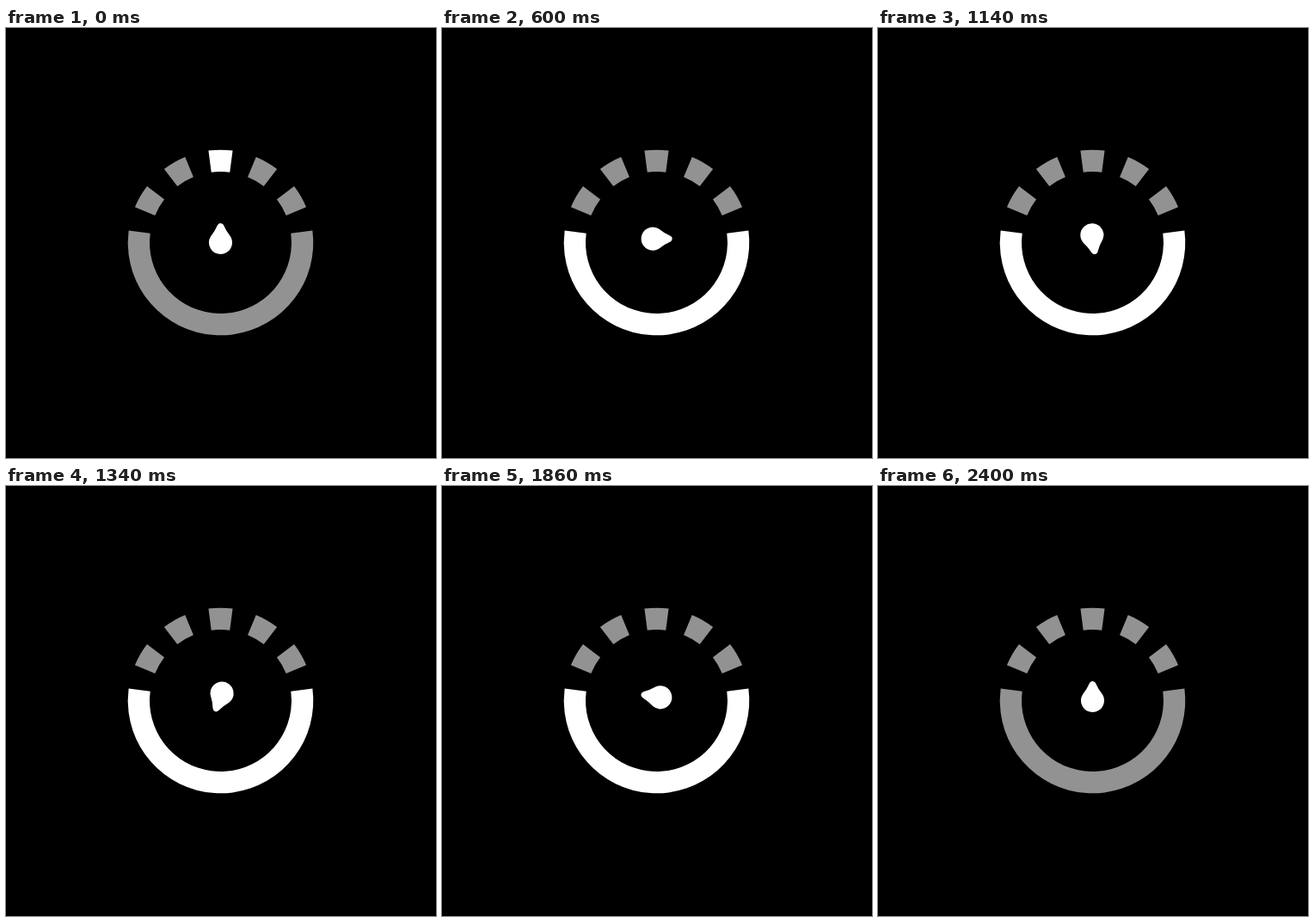
These frames come from a looping animation (500x500 px, 2.42 s). An HTML page with a canvas:

```html
<!DOCTYPE html>
<html lang="en">
<head>
<meta charset="utf-8">
<title>Dial</title>
<style>
  html, body { margin: 0; width: 100%; height: 100%; overflow: hidden; background: #000; }
  canvas { display: block; }
</style>
</head>
<body>
<canvas id="stage" width="500" height="500"></canvas>
<script>
const ctx = document.getElementById('stage').getContext('2d');
const FRAME_MS = 20, FRAMES = 121, DEG_PER_FRAME = 3;
const CENTER = 249.5, OUTER = 107.8, INNER = 82.5;
const PIVOT_Y = 245.1;
const GREY = '#929292', WHITE = '#fff';

// Clockwise degrees from the top; each part is lit while on <= frame < off.
const parts = [
  { from: -7.5, to: 7.5, on: 0, off: 8 },
  { from: 22.5, to: 37.5, on: 8, off: 18 },
  { from: 52.5, to: 67.5, on: 18, off: 28 },
  { from: 82.5, to: 277.5, on: 28, off: 98 },
  { from: 292.5, to: 307.5, on: 98, off: 108 },
  { from: 322.5, to: 337.5, on: 108, off: 118 }
];

const rad = deg => deg * Math.PI / 180;

function drawPart({ from, to }, color) {
  const a = rad(from - 90), b = rad(to - 90);
  ctx.fillStyle = color;
  ctx.beginPath();
  ctx.arc(CENTER, CENTER, OUTER, a, b);
  ctx.arc(CENTER, CENTER, INNER, b, a, true);
  ctx.closePath();
  ctx.fill();
}

function drawDrop(deg) {
  const bodyY = 4.4, bodyR = 13.5, tipY = -14, tipR = 4;
  const tilt = Math.asin((bodyR - tipR) / (bodyY - tipY));
  const c = Math.cos(tilt), s = Math.sin(tilt);
  ctx.save();
  ctx.translate(CENTER, PIVOT_Y);
  ctx.rotate(rad(deg));
  ctx.fillStyle = WHITE;
  ctx.beginPath();
  ctx.arc(0, tipY, tipR, Math.PI + tilt, -tilt);
  ctx.quadraticCurveTo(6.6, -8.7, bodyR * c, bodyY - bodyR * s);
  ctx.arc(0, bodyY, bodyR, -tilt, Math.PI + tilt);
  ctx.quadraticCurveTo(-6.6, -8.7, -tipR * c, tipY - tipR * s);
  ctx.fill();
  ctx.restore();
}

function render(ms) {
  const frame = Math.floor(ms / FRAME_MS) % FRAMES;
  ctx.fillStyle = '#000';
  ctx.fillRect(0, 0, 500, 500);
  for (const part of parts) {
    drawPart(part, frame >= part.on && frame < part.off ? WHITE : GREY);
  }
  drawDrop(frame * DEG_PER_FRAME);
}

const start = performance.now();
function tick() {
  render(performance.now() - start);
  requestAnimationFrame(tick);
}
tick();
</script>
</body>
</html>
```
